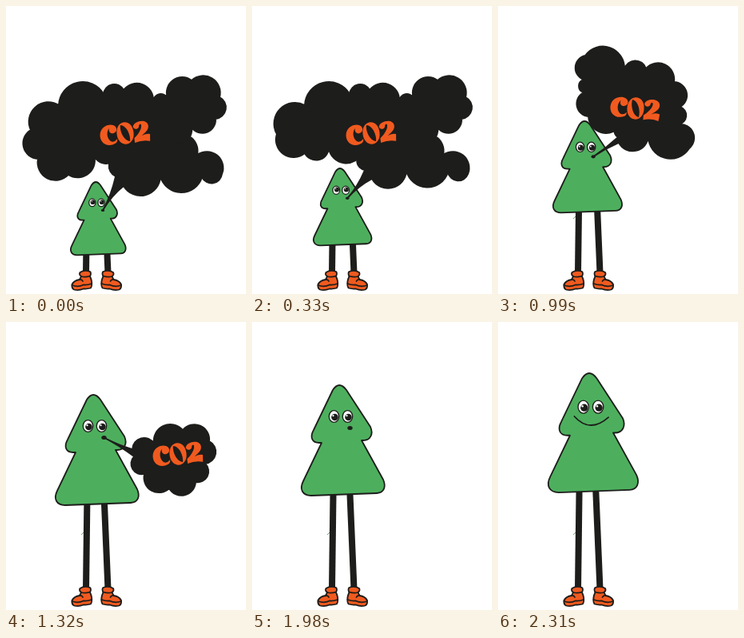
An HTML page that plays this animation: 300x360 px, repeating every 2640 ms.

```html
<!DOCTYPE html>
<html lang="en">
<head>
<meta charset="utf-8">
<title>Growing tree</title>
<style>
html, body { margin: 0; width: 100%; height: 100%; overflow: hidden; background: #fff; }
svg { display: block; width: 300px; height: 360px; }
.line { stroke: #1d1d1b; stroke-width: 1.8; stroke-linejoin: round; stroke-linecap: round; }
.line * { vector-effect: non-scaling-stroke; }
.none { fill: none; }
.ink { fill: #1d1d1b; }
.white { fill: #fff; stroke-width: 1.3; }
.green { fill: #4daf5d; }
.orange { fill: #f15a1f; }
</style>
</head>
<body>
<svg viewBox="0 0 300 360">
  <defs>
    <path id="body" vector-effect="non-scaling-stroke" d="M39 6Q47-6 56 6L86 52C90 61 86 69 77 69H75L102 118C106 127 103 134.5 94 135L12 138C1 138-3 130 2 120L25 72H22C13 72 10 65 15 56Z"/>
    <g id="shoe" class="line">
      <path class="orange" d="M92.5 333Q98 329.5 105 332Q107 334 105 338Q108 344 107 350L106 352.5Q101 354 97 353.5Q91 356 85 354.5Q82 353 82.5 348Q85 343 92 342L94 338Q91 336 92.5 333Z"/>
      <path class="none" d="M82.5 349Q90 352 97 348.5Q102 349 107 347M94 338Q99 339.5 105 337.5M92 342Q95 341.5 96 344"/>
    </g>
    <g id="label" class="orange" fill-rule="evenodd" role="img" aria-label="CO2">
      <path d="M-11-9C-14-16-32-15-33 0C-33 12-22 16-13 11Q-11 9.5-11 6Q-16 11-20 8C-25 3-24-5-20-9C-22-4-18-.5-14.5-2C-11-3-10-6-11-9Z"/>
      <path d="M-11 0C-11-19 11-19 11 0C11 19-11 19-11 0ZM-5-11C3-10 7 4 5 11C-3 10-7-4-5-11Z"/>
      <path d="M11-7C13-15 31-16 31-6C31 0 24 3 21 6Q26 3 32 5L31 14Q21 11 11 14V8C16 4 22-2 22-8Q21-11 19-8C19-3 12-2 11-7Z"/>
    </g>
  </defs>
  <g id="scene"></g>
  <use href="#shoe"/>
  <use href="#shoe" transform="matrix(-1 0 0 1 226.5 0)"/>
</svg>
<script>
const STEP = 330;

// A cloud is the dents of its outline, clockwise from the tail; round puffs join them.
const top3 = "122 110 147 105 184 119";
const crown = `66 124 ${top3} 202 115 232 93 267 114 262 141 232 152 204 166 239 186 270 210`;

// tree: left, top, size; label: x, y, tilt
const poses = [
  { tree: [81, 220, .662], label: [149, 159, -7],
    dents: `137 213 141 186 109 184 78 211 40 191 31 155 ${crown} 245 214 193 213 147 225` },
  { tree: [77, 203, .698], label: [149, 159, -7],
    dents: `141 205 138 183 96 178 66 184 31 160 ${crown} 245 208 193 206 150 216` },
  { tree: [73, 187, .733], label: [149, 159, -7],
    dents: `143 205 139 180 96 177 66 184 31 164 80 148 73 112 ${top3} 203 143 202 163 226 188 186 200 145 207` },
  { tree: [69, 144, .829], label: [172, 128, 5],
    dents: "150 164 154 148 113 138 107 108 107 92 109 62 158 79 185 78 220 95 228 126 226 148 239 178 188 163 151 171" },
  { tree: [62, 91, 1], label: [215, 165, -7],
    dents: "158 159 185 152 221 135 254 149 249 177 237 200 204 208 173 190 160 168" },
  { tree: [62, 79, 1], label: [200, 153, -7],
    dents: "160 143 170 136 207 132 238 132 240 150 226 168 190 170 158 163 155 150" },
  { tree: [62, 79, 1] },
  { tree: [63, 64, 1.08], smile: true }
];

const mix = (a, b, t) => a + (b - a) * t;
const disc = (cls, x, y, rx, ry = rx) =>
  `<ellipse class="${cls}" cx="${x}" cy="${y}" rx="${rx}" ry="${ry}"/>`;

// Each leg lies on a fixed line that the rising tree uncovers.
function leg(hip, foot, y) {
  return `<path d="M${mix(foot, hip, (334 - y) / 118)} ${y}L${foot} 334" stroke="#1d1d1b" stroke-width="8"/>`;
}

function eye(x, lift) {
  return disc("white", x, 39, 6.2, 7.4)
    + `<g stroke="none">${disc("ink", x + 1, 39 + lift, 4.3)}${disc("white", x - 1, 37.2 + lift, 1.1)}</g>`;
}

function drawTree([x, y, size], smile) {
  const hipY = y + 134 * size;
  const lift = size < .8 ? -1 : 1;
  const mouth = smile
    ? '<path class="none" d="M30 50Q48 70 69.5 51"/>'
    : `<g stroke="none">${disc("ink", 60.5, 53.5, 3.2, 2.5)}</g>`;
  return '<path d="M94 266L98 262" stroke="#4a8a50" stroke-width=".8"/>'
    + leg(101.5, 100, hipY) + leg(122.5, 127.5, hipY)
    + `<g class="line" transform="translate(${x} ${y}) scale(${size})">
       <use href="#body" class="green"/>${eye(40.5, lift)}${eye(57.5, lift)}${mouth}</g>`;
}

function drawCloud([x, y, size], dents, [labelX, labelY, tilt]) {
  const mouth = [x + 60.5 * size, y + 53.5 * size];
  const n = dents.split(" ").map(Number);
  const first = n.slice(0, 2), last = n.slice(-2);
  const waist = mouth.map((m, i) => mix(m, mix(first[i], last[i], .5), .5));
  let d = `M${mouth}Q${waist} ${first}`;
  for (let i = 2; i < n.length; i += 2) {
    const r = .52 * Math.hypot(n[i] - n[i - 2], n[i + 1] - n[i - 1]);
    d += `A${r} ${r} 0 0 1 ${n[i]} ${n[i + 1]}`;
  }
  return `<path class="ink line" d="${d}Q${waist} ${mouth}Z"/>
    <use href="#label" transform="translate(${labelX} ${labelY}) rotate(${tilt}) scale(.96)"/>`;
}

const scenes = poses.map(({ tree, smile, dents, label }) =>
  drawTree(tree, smile) + (dents ? drawCloud(tree, dents, label) : ""));
const scene = document.getElementById("scene");
const start = performance.now();
let shown = -1;

function draw() {
  const i = Math.floor((performance.now() - start) / STEP) % scenes.length;
  if (i !== shown) scene.innerHTML = scenes[shown = i];
  requestAnimationFrame(draw);
}
draw();
</script>
</body>
</html>
```
